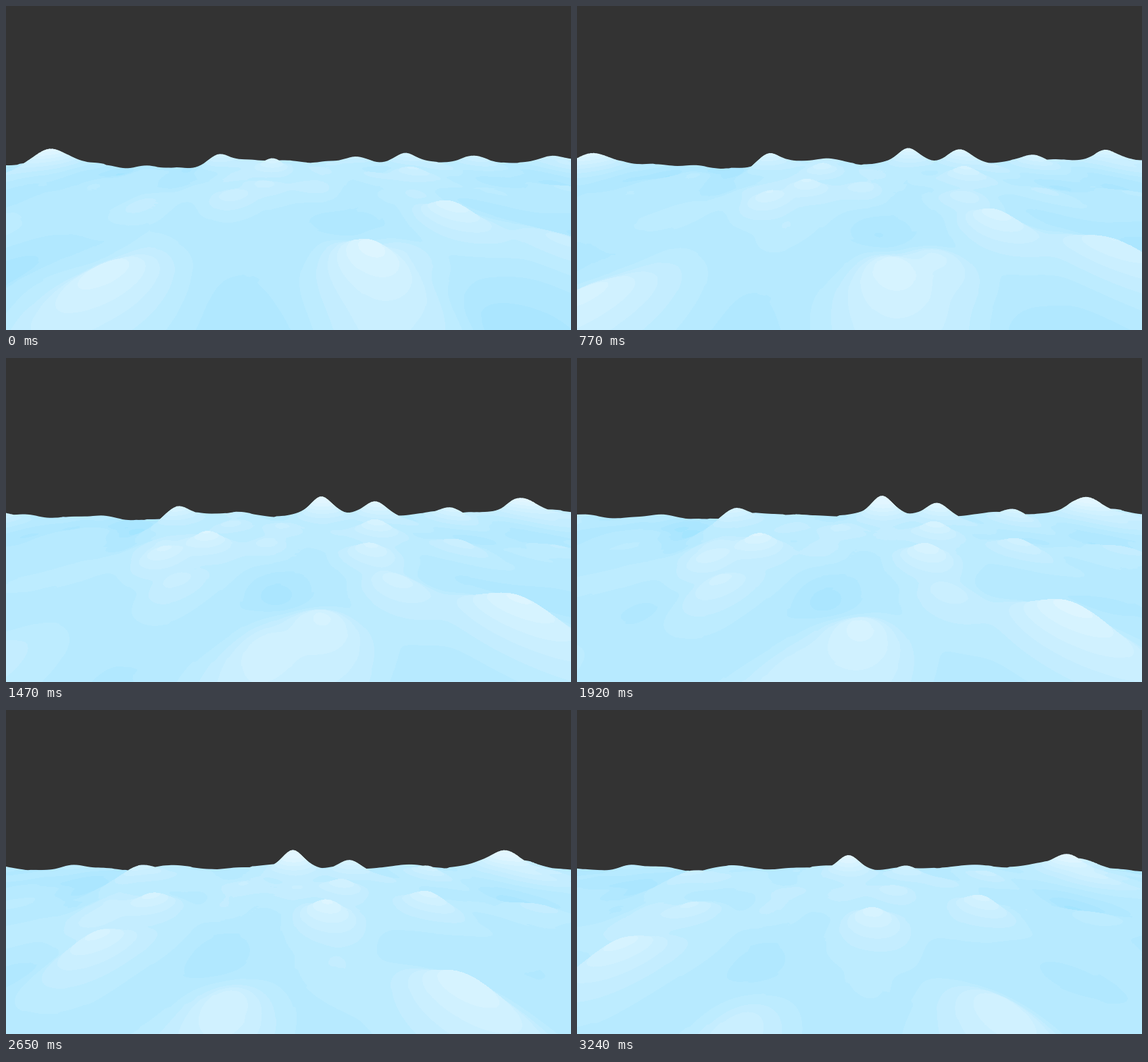
An HTML page with a canvas that plays this animation: 836 by 480 pixels, repeating every 3.34 s.

```html
<!DOCTYPE html>
<html lang="en">
<head>
<meta charset="utf-8">
<title>Rolling waves</title>
<style>
  html, body { margin: 0; width: 100%; height: 100%; overflow: hidden; background: #333; }
  canvas { display: block; width: 836px; height: 480px; }
</style>
</head>
<body>
<canvas id="sea" width="836" height="480"></canvas>
<script>
const W = 836, H = 480, LOOP = 3340;
// Uneven start, then a steady beat
const STEPS = [0, 270, 470, 620, 770];
for (let i = 0; i < 16; i++) STEPS.push(1030 + i * 146.6);

// Camera: vanishing point, focal length, visible depth in px below the vanishing line
const VX = W / 2, VY = 140, FOCAL = 320, NEAR = 540, FAR = 98;
// Travel per second, ahead and sideways
const SPEED = 0.144, DRIFT = 0.352;
const RADIUS = 0.18, BASE = 0.02, LIFE = 2.4, REACH = 3.7;
const ROWS = 220, CELL = 4, COLS = W / CELL + 1;

// Main crests: seconds, x, y on the stage
const CRESTS = [
  [0, 62, 214], [1.5, 250, 221], [0, 395, 226], [1.6, 542, 214],
  [1.6, 654, 222], [2.4, 744, 210], [2.2, 440, 203],
  [1.6, 541, 240], [1.8, 274, 262], [2.9, 615, 270], [2.4, 490, 282],
  [1.1, 262, 273], [3, 92, 332], [0.3, 640, 295],
  [0.1, 130, 390], [0.1, 528, 360], [2, 415, 389], [2, 725, 373]
];

// World place of a crest, undoing the travel up to its moment
const crests = CRESTS.map(([t, x, y]) => {
  const drop = Math.max(104, (y - VY) / 0.76);
  return {
    t,
    x: (x - VX) / drop + DRIFT * t,
    z: FOCAL / drop + SPEED * t,
    h: 1 - (y - VY) / drop - BASE
  };
});

let seed = 7;
function random() {
  seed = (seed * 16807) % 2147483647;
  return seed / 2147483647;
}

// Smaller swells and hollows scattered between the crests
const swells = [];
for (let z = 0.6; z < 4; z += 0.5) {
  for (let x = -4.8; x < 5.8; x += 0.55) {
    const s = {
      x: x + 0.4 * random(), z: z + 0.4 * random(),
      h: 0.24 * (random() - 0.42), phase: 6.28 * random()
    };
    if (crests.every(c => Math.hypot(c.x - s.x, c.z - s.z) > 0.4)) swells.push(s);
  }
}

const drops = Array.from({ length: ROWS },
  (_, i) => NEAR * Math.pow(FAR / NEAR, i / (ROWS - 1)));
const field = new Float32Array(ROWS * COLS);
const ctx = document.getElementById("sea").getContext("2d");
const image = ctx.createImageData(W, H);
const pixels = new Uint32Array(image.data.buffer);

function pack(r, g, b) {
  return (255 << 24 | b << 16 | g << 8 | r) >>> 0;
}
const SKY = pack(51, 51, 51);

function shade(h, cover = 1) {
  const band = Math.floor((h + 0.17) / 0.038) * 0.038;
  const k = Math.max(0, Math.min(1, band / 0.45));
  const mix = v => Math.round(51 + (v - 51) * cover);
  return pack(mix(152 + 74 * k), mix(225 + 21 * k), mix(255));
}

function ripple(x, z, t) {
  return 0.012 * Math.sin(5.1 * x + 1.3 * Math.sin(4 * z + 0.5 * t))
    + 0.012 * Math.sin(6.3 * z + 1.7 * Math.sin(3.1 * x) + 0.6 * t)
    + 0.006 * Math.sin(11 * x + 8 * z - t);
}

function profile(b, x, z) {
  const dx = (x - b.x) / RADIUS, dz = (z - b.z) / RADIUS;
  const r = dx * dx + dz * dz;
  return r > REACH * REACH ? 0 : b.h / (1 + 0.3 * r) ** 2;
}

function buildField(t) {
  const up = crests.map(c => ({ ...c, h: c.h * Math.exp(-(((t - c.t) / LIFE) ** 2)) }));
  const small = swells.map(s => ({ ...s, h: s.h * (0.75 + 0.25 * Math.sin(1.8 * t + s.phase)) }));
  for (let i = 0; i < ROWS; i++) {
    const z = FOCAL / drops[i] + SPEED * t;
    const close = b => Math.abs(b.z - z) < RADIUS * REACH;
    const rowUp = up.filter(close), rowSmall = small.filter(close);
    for (let j = 0; j < COLS; j++) {
      const x = (j * CELL - VX) / drops[i] + DRIFT * t;
      let sum = 0, h = BASE + ripple(x, z, t);
      for (const b of rowUp) sum += profile(b, x, z) ** 3;
      for (const b of rowSmall) h += profile(b, x, z);
      field[i * COLS + j] = h + Math.cbrt(sum);
    }
  }
}

// Paints one pixel column from the nearest row back to the skyline
function drawColumn(x) {
  const j = Math.min(COLS - 2, Math.floor(x / CELL)), f = x / CELL - j;
  let top = H, peak = H, peakH = 0, lastY = H, lastH = 0;
  for (let i = 0; i < ROWS; i++) {
    const a = field[i * COLS + j], b = field[i * COLS + j + 1];
    const h = a + (b - a) * f;
    const y = VY + drops[i] * (1 - h);
    if (y < peak) {
      const end = Math.max(0, Math.ceil(y));
      for (let p = top - 1; p >= end; p--) {
        const k = Math.max(0, Math.min(1, (lastY - p) / (lastY - y)));
        pixels[p * W + x] = shade(lastH + (h - lastH) * k);
      }
      top = Math.min(top, end);
      peak = y;
      peakH = h;
    }
    lastY = y;
    lastH = h;
  }
  if (top > 0) pixels[(top - 1) * W + x] = shade(peakH, top - peak);
}

function draw(ms) {
  buildField(ms / 1000);
  pixels.fill(SKY);
  for (let x = 0; x < W; x++) drawColumn(x);
  ctx.putImageData(image, 0, 0);
}

const start = performance.now();
let shown = -1;
function tick() {
  const now = (performance.now() - start) % LOOP;
  const step = STEPS.filter(s => s <= now).pop();
  if (step !== shown) draw(shown = step);
  requestAnimationFrame(tick);
}
tick();
</script>
</body>
</html>
```
